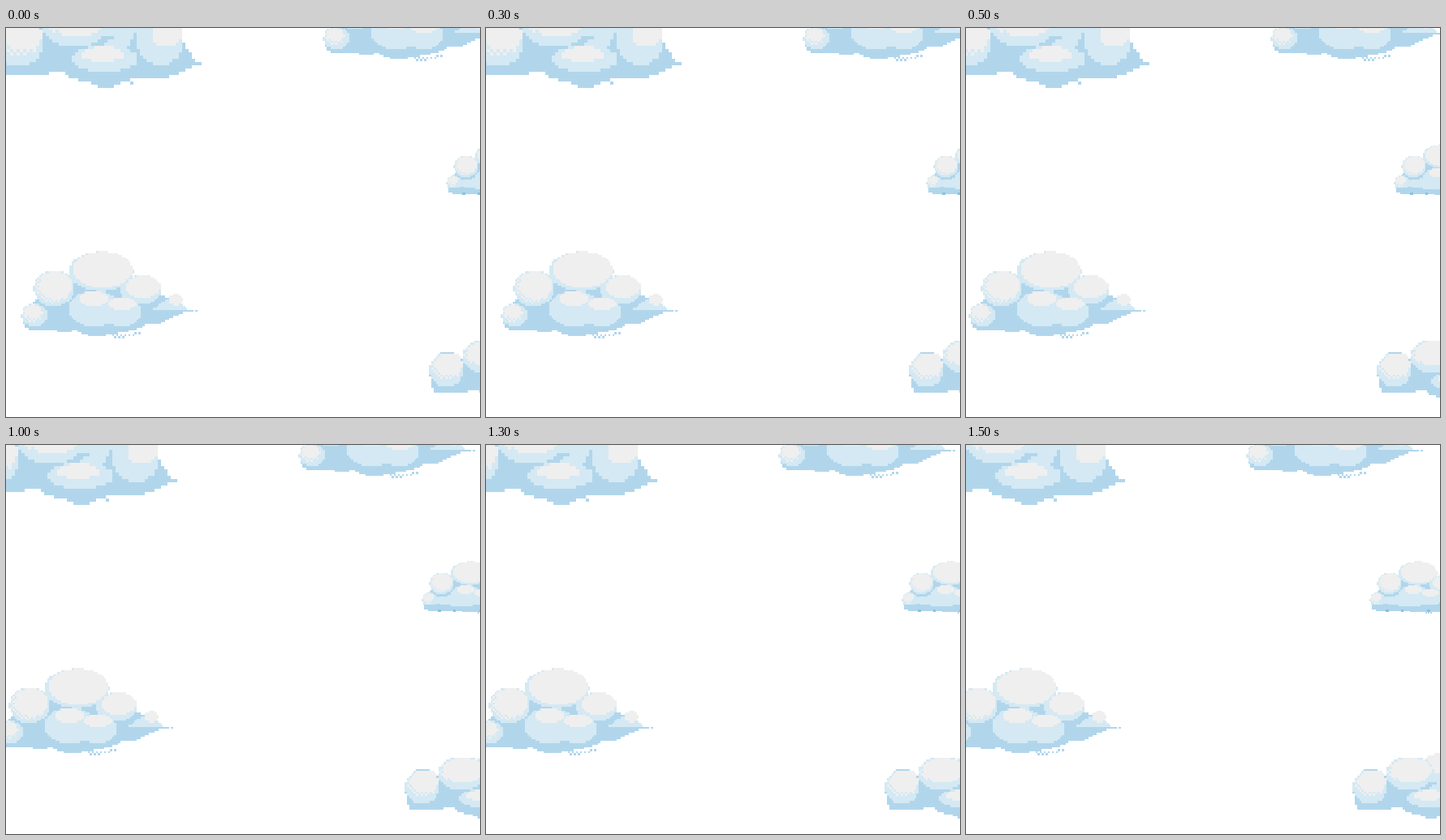
These frames come from a looping animation (584x480 px, 2 s). An HTML page with a canvas:

```html
<!DOCTYPE html>
<html lang="en">
<head>
<meta charset="utf-8">
<title>Drifting pixel clouds</title>
<style>
  html, body { margin: 0; width: 100%; height: 100%; overflow: hidden; background: #fff; }
  canvas { display: block; }
</style>
</head>
<body>
<canvas id="sky" width="584" height="480"></canvas>
<script>
const ctx = document.getElementById('sky').getContext('2d');
const BLUE = '#b1d6ec', LIGHT = '#d4e9f3', GREY = '#efefef', DEEP = '#86c4e2';
const STEP_MS = 500, STEPS = 4, STEP_PX = 15;

// Shapes; dithered ones fill only every other cell, like a checkerboard.
const poly = (color, d, dither) => ({ color, path: new Path2D(d), dither });
function oval(color, x, y, rx, ry, dither) {
  const path = new Path2D();
  path.ellipse(x, y, rx, ry, 0, 0, Math.PI * 2);
  return { color, path, dither };
}

// Rasterises shapes into hard-edged cells, one canvas pixel per cell.
function makeSprite(x, y, w, h, cell, shapes) {
  const image = document.createElement('canvas');
  image.width = w / cell;
  image.height = h / cell;
  const c = image.getContext('2d');
  for (let j = 0; j < image.height; j++) {
    for (let i = 0; i < image.width; i++) {
      const px = x + (i + .5) * cell, py = y + (j + .5) * cell;
      const top = shapes.findLast(s =>
        !(s.dither && (i + j) % 2) && c.isPointInPath(s.path, px, py));
      if (!top) continue;
      c.fillStyle = top.color;
      c.fillRect(i, j, 1, 1);
    }
  }
  return { image, x, y, w: image.width * cell, h: image.height * cell };
}

const puffyShapes = [
  poly(BLUE, 'M19 358L24 371 42 372 60 373 68 376 86 373 97 378 112 381 128 378 150 374 165 370 172 366 190 364 205 357 221 350 231 349.5 231 347 222 347 190 328 118 300 60 310 36 335Z'),
  poly(BLUE, 'M233 347h3v2.5h-3z'),
  oval(LIGHT, 35, 354, 16, 14),
  oval(GREY, 33, 352, 12, 10, true),
  oval(GREY, 33, 349, 11, 8),
  oval(LIGHT, 59, 321, 25, 22),
  oval(GREY, 57, 320, 22, 19, true),
  oval(GREY, 61, 317, 20, 17),
  oval(LIGHT, 117, 300, 40, 24),
  oval(GREY, 119, 298, 37, 22),
  oval(LIGHT, 166, 323, 25, 18),
  oval(GREY, 169, 319, 21, 14),
  poly(LIGHT, 'M180 347L196 335 215 337 223 347Z'),
  oval(GREY, 209, 335, 9, 7),
  oval(LIGHT, 109, 346, 32, 22),
  oval(LIGHT, 143, 350, 23, 18),
  oval(GREY, 108, 334, 18, 9),
  oval(GREY, 143, 340, 17, 8),
  poly(BLUE, 'M126 376L150 378 164 373 168 376 150 381 136 383Z', true)
];
const flatShapes = [
  ...puffyShapes,
  poly(BLUE, 'M24 366L24 376 110 379 236 379 236 366Z'),
  oval(LIGHT, 100, 356, 62, 11),
  ...[51, 82, 136].map(x => poly(DEEP, `M${x} 375h6v4h-6z`))
];
const wideShapes = [
  poly(BLUE, 'M-16 10L-10 48 -4 58 50 58 56 53 66 53 82 62 98 66 112 70 114 74 130 74 134 70 150 66 152 62 196 62 206 58 216 54 228 50 228 46 241 45 241 42 233 41 229 33 222 27 214 0 200 -20 100 -20 40 0Z'),
  oval(BLUE, 17, 22, 31, 36),
  oval(LIGHT, 16, 18, 30, 30),
  oval(GREY, 16, 13, 26, 23, true),
  oval(GREY, 20, 8, 25, 20),
  oval(LIGHT, 142, -8, 34, 35),
  oval(GREY, 142, -24, 32, 18),
  oval(LIGHT, 86, -6, 43, 30),
  oval(GREY, 84, -10, 38, 21, true),
  oval(GREY, 88, -12, 36, 22),
  poly(BLUE, 'M50 52L62 34 100 22 126 8 132 12 112 24 90 34 76 52Z'),
  poly(BLUE, 'M150 24L158 8 176 -4 184 0 166 22 166 50 150 40Z'),
  oval(LIGHT, 190, 14, 29, 32),
  oval(GREY, 198, 5, 19, 19),
  oval(LIGHT, 122, 38, 40, 16),
  oval(GREY, 118, 33, 27, 8),
  oval(GREY, 122, 27, 14, 6),
  poly(BLUE, 'M154 54h4v4h-4zM154 66h4v4h-4zM150 62h4v4h-4z')
];

const puffy = makeSprite(18, 275, 220, 110, 2.5, puffyShapes);
const flat = makeSprite(18, 275, 220, 110, 2.5, flatShapes);
const wide = makeSprite(-15, -46, 260, 124, 4, wideShapes);

const clouds = [
  { sprite: wide, dx: 0, dy: 0, scale: 1 },
  { sprite: wide, dx: 531.6, dy: 409.4, scale: .7 },
  { sprite: puffy, dx: 0, dy: 0, scale: 1 },
  { sprite: puffy, dx: 372, dy: -342, scale: 1 },
  { sprite: flat, dx: 531.6, dy: -22, scale: .6 }
];

function draw() {
  const step = Math.floor(performance.now() / STEP_MS) % STEPS;
  ctx.clearRect(0, 0, 584, 480);
  ctx.imageSmoothingEnabled = false;
  for (const { sprite: s, dx, dy, scale } of clouds) {
    ctx.drawImage(s.image, dx + s.x * scale - step * STEP_PX, dy + s.y * scale,
      s.w * scale, s.h * scale);
  }
  requestAnimationFrame(draw);
}
draw();
</script>
</body>
</html>
```
